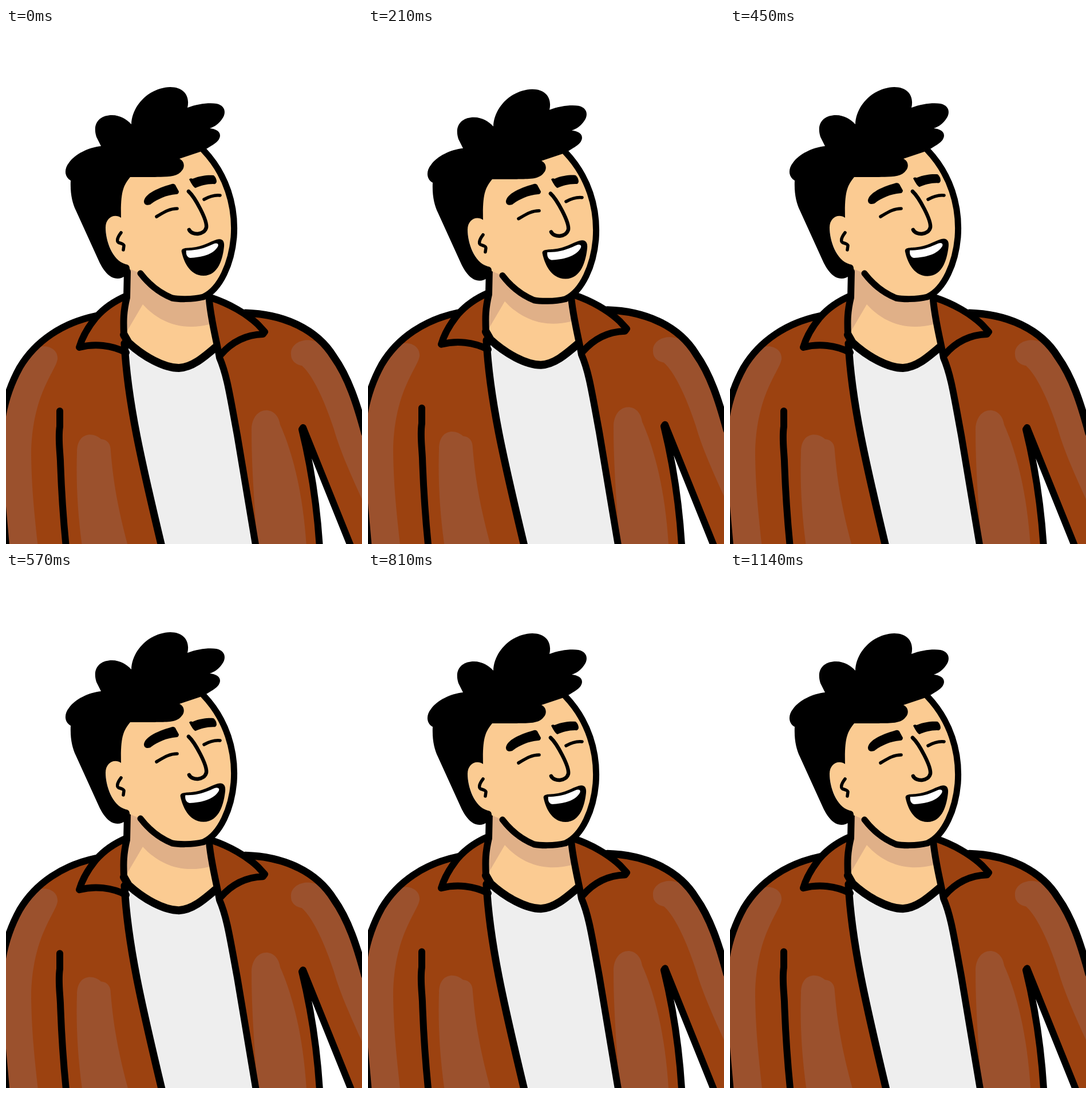
An HTML page for the animation above (1170 ms loop, 622 by 900 pixels).

```html
<!DOCTYPE html>
<html lang="en">
<head>
<meta charset="utf-8">
<title>Laughing man</title>
<style>
  html, body { margin: 0; width: 100%; height: 100%; overflow: hidden; background: #fff; }
  svg { display: block; width: 100%; height: 100%; }
  .line { fill: none; stroke: #000; stroke-linecap: round; stroke-linejoin: round; }
  .jacket { fill: #9c4210; }
  .shine { fill: #9b512d; }
  .skin { fill: #fbcb92; }
</style>
</head>
<body>
<svg viewBox="0 0 622 900">
  <g id="body">
    <path class="jacket" d="M211 467C185 478 170 490 157 502C100 514 52 545 24 592C4 628-4 660-8 690V930H547C543 830 532 760 518 697L620 935L640 930V740C622 680 602 613 573 574C543 525 485 499 418 497L360 470Z"/>
    <path class="shine" d="M50 560C70 548 92 560 90 578C86 600 45 640 44 745C45 810 50 850 58 925H3C-5 800-12 740 0 660C10 610 30 570 50 560Z"/>
    <path class="shine" d="M124 740C124 705 152 704 166 717C178 718 183 726 183 738C188 800 198 850 219 925H136C126 860 122 800 124 740Z"/>
    <path class="shine" d="M429 700C430 658 474 656 479 692C503 745 522 825 526 925H441C434 830 429 770 429 700Z"/>
    <path class="shine" d="M498 570C495 545 535 535 552 555C580 590 612 650 635 720V850C600 775 583 735 573 700C555 645 535 605 517 589C505 587 498 579 498 570Z"/>
    <path fill="#eee" d="M207 545C212 650 240 760 276 925H440L404 710C392 640 380 590 366 555Z"/>
    <path class="skin" d="M212 420L211 470L207 540C240 572 280 592 305 592C325 590 345 575 366 557L355 465V430Z"/>
    <path fill="#e0b088" d="M212 415H355V517C310 528 270 516 239 482L212 528Z"/>
    <g class="line" stroke-width="12">
      <path d="M157 502C100 514 52 545 24 592C4 628-4 660-8 690M-9 800L2 925"/>
      <path stroke-width="13" d="M418 497C485 499 543 525 573 574C598 609 613 655 627 707"/>
      <path d="M94 668V695C91 715 94 735 95 755C97 815 101 870 107 925"/>
      <path d="M549 925C545 840 533 765 517 700L519 697L611 925"/>
      <path d="M212 425L211 470C205 495 205 510 206 535"/>
      <path stroke-width="14" d="M206 535L214 549C240 573 276 593 302 593C325 592 345 575 366 557"/>
      <path stroke-width="13" d="M207 550C212 650 236 755 277 925"/>
      <path d="M355 474C358 510 369 550 373 575C386 605 391 640 404 710L440 925"/>
      <path d="M211 467C185 478 170 490 157 505C143 522 133 540 128 557C155 550 185 553 210 566"/>
      <path d="M360 471C390 481 420 498 440 517L452 530L449 534C418 535 394 548 375 570"/>
    </g>
  </g>
  <g id="head">
    <path class="skin" d="M345 213C385 255 402 310 398 365C394 410 375 455 345 468C325 474 300 472 290 471C265 460 248 445 235 428L213 419C185 405 174 370 174 348C170 300 190 250 240 235Z"/>
    <path class="line" stroke-width="11" d="M345 213C385 255 402 310 398 365C394 410 375 455 345 469C325 474 300 473 290 471C265 461 248 445 235 428"/>
    <path d="M113 266C102 260 101 246 110 235C120 220 145 208 166 206L158 190C150 165 165 152 185 152C200 152 212 160 219 168C220 135 250 104 287 103C310 103 322 118 317 139C335 132 355 130 368 132C385 136 384 150 378 158C372 167 365 172 356 175C368 176 377 182 373 192C370 201 355 207 345 214L303 228C312 232 313 243 307 249C298 262 275 259 260 260L217 260C205 275 200 285 201 331C190 323 174 330 174 348C174 370 185 405 209 412Q217 413 216 421C213 430 205 437 195 437C180 437 170 422 163 408L122 318C116 305 112 290 113 266Z"/>
    <g class="line" stroke-width="5.5">
      <path d="M263 329C275 322 285 315 299 315"/>
      <path d="M346 299C355 294 365 291 374 292"/>
      <path d="M201 357C194 366 192 374 199 375Q206 377 206 380L205 387"/>
      <path stroke-width="6.5" d="M319 285C330 295 352 335 350 348C346 362 325 362 320 352"/>
    </g>
    <g id="brows">
      <path d="M241 302C243 290 262 280 290 272Q295 271 297 276L302 285Q302 290 297 290C280 291 262 300 252 308C245 310 241 308 241 302Z"/>
      <path d="M320 264Q322 261 326 263C340 257 355 256 363 257Q368 262 368 268Q367 273 362 272C350 272 340 275 331 279Q327 278 320 264Z"/>
    </g>
    <g id="mouth">
      <path d="M307 391C305 383 315 384 325 383C345 381 355 373 368 369C378 366 382 372 381 381C379 400 372 432 345 432C320 432 310 405 307 391Z"/>
      <path fill="#fff" d="M315 388C340 388 352 381 364 376C370 374 373 378 369 383C360 396 340 400 322 401C316 400 314 394 315 388Z"/>
    </g>
  </g>
</svg>
<script>
const LOOP = 1170, SLOT = 30;
// [step, amount] at 24 steps per 30 slots
const bob = [[0, 0], [6, 1], [12, 0], [18, 1], [21, 1], [24, 0], [28, 1], [32, 1]];
const laugh = [[0, 0], [5, 1], [9.5, 0], [15, 1], [21, 0], [25, .6], [30, 0], [32, 0]];

function ease(keys, n) {
  const i = keys.findIndex(k => k[0] > n);
  const [a, v] = keys[i - 1], [b, w] = keys[i];
  return v + (w - v) * (1 - Math.cos(Math.PI * (n - a) / (b - a))) / 2;
}

function set(id, transform) {
  document.getElementById(id).setAttribute('transform', transform);
}

function draw(now) {
  const slot = Math.floor(now % LOOP / SLOT);
  const step = Math.floor(slot * 4 / 5);
  const b = ease(bob, step), m = ease(laugh, step);
  set('head', `translate(0 ${4 * b})`);
  set('body', `translate(0 ${-5.7 * b})`);
  set('brows', `translate(0 ${-3.8 * m})`);
  set('mouth', `translate(344 400) scale(${1 + .055 * m}) translate(-344 -400)`);
  requestAnimationFrame(draw);
}
draw(0);
</script>
</body>
</html>
```
